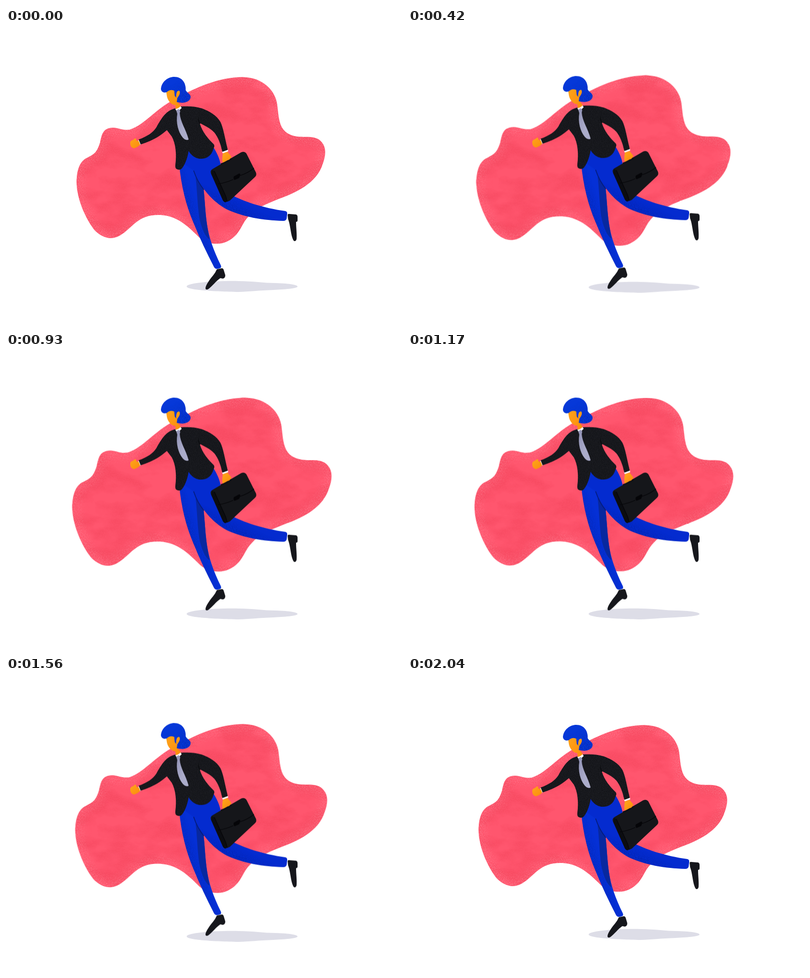
Animation, 800 px wide and 600 px high, one loop 2.07 s. Source, as an HTML page:

```html
<!DOCTYPE html>
<html lang="en">
<head>
<meta charset="utf-8">
<title>Running with a briefcase</title>
<style>
  html, body { margin: 0; width: 100%; height: 100%; overflow: hidden; background: #fff; }
  svg { display: block; width: 800px; height: 600px; }

  #blob, #runner, #shadow {
    animation: 2070ms cubic-bezier(.37, 0, .63, 1) infinite;
  }
  #blob { transform-origin: 346px 257px; animation-name: swell; }
  #runner { --shift: -6.5px; animation-name: drift; }
  #shadow { --shift: 7px; animation-name: drift; }

  @keyframes swell {
    0%, 90.3%, 100% { transform: scale(1); }
    39.6%, 50.7% { transform: scale(1.043); }
  }
  @keyframes drift {
    0%, 7.2%, 96.1%, 100% { transform: translateY(0); }
    46.8%, 57.5% { transform: translateY(var(--shift)); }
  }
</style>
</head>
<body>
<svg viewBox="0 0 800 600">
  <defs>
    <path id="cloud" d="M216 202C228 202 234 208 250 206C282 196 304 160 350 140C380 122 430 99.5 478 99.5C520 100 545 128 548 156C552 190 552 214 588 220C606 222 618 218 632 226C648 238 647 256 640 275C628 315 585 334 552 346C525 357 505 365 490 382C474 398 474 420 446 433C432 440 408 439 392 426C372 407 350 381 312 379C268 377 258 402 234 418C214 432 196 426 180 411C164 392 143 350 142.5 312C143 290 148 270 164 263C178 256 184 252 190 232C194 214 196 203 216 202Z"/>
    <path id="frontLeg" d="M350 278C354 320 364 360 378 393C391 425 405 455 420 484Q422 489 428 488L432 487Q436 486 434 481C419 450 410 425 406 398C402 370 402 350 399 326L386 270Z"/>
    <path id="backLeg" d="M352 270L369 245L418 240C427 254 433 268 434 280L455 338C478 351 520 365 564 371Q569 372 568 378L567 386Q566 391 560 391C520 390 478 383 445 367C415 350 394 324 379 289Z"/>
    <path id="hair" d="M313 124C314 109 327 99 340 99C356 99 364 112 363 126C365 131 372 133 373 139C373 149 361 154 345 150L343 139C339 139 342 132 341 128C336 124 328 126 325 130C319 132 314 130 313 124Z"/>
    <path id="jacket" d="M342 163L354 159C370 158 384 159 396 163C412 169 426 178 433 190C439 202 442 222 448 247L437 251C434 236 429 222 421 212C412 202 400 198 391 192C397 212 408 224 420 236Q422 239 419 245C415 260 404 266 391 265C382 264 373 257 369 249C366 266 361 278 355 285Q351 289 345 286Q342 285 342 279C345 256 343 235 335 220L325 207C307 223 290 230 272 236L268 226C285 220 297 212 304 201C315 181 324 167 342 163Z"/>
    <clipPath id="inCloud"><use href="#cloud"/></clipPath>

    <linearGradient id="legShade" gradientUnits="userSpaceOnUse" x1="355" y1="400" x2="402" y2="384">
      <stop offset=".2" stop-color="#001a86"/><stop offset=".9" stop-color="#001a86" stop-opacity="0"/>
    </linearGradient>
    <linearGradient id="thighShade" gradientUnits="userSpaceOnUse" x1="452" y1="378" x2="470" y2="340">
      <stop offset="0" stop-color="#001a86"/><stop offset=".8" stop-color="#001a86" stop-opacity="0"/>
    </linearGradient>
    <linearGradient id="hairShade" gradientUnits="userSpaceOnUse" x1="338" y1="104" x2="366" y2="150">
      <stop offset=".1" stop-color="#001f9c" stop-opacity="0"/><stop offset="1" stop-color="#001f9c"/>
    </linearGradient>
    <linearGradient id="skin" x1="0" y1="0" x2="1" y2="1">
      <stop offset="0" stop-color="#ffa51c"/><stop offset="1" stop-color="#fb8c0c"/>
    </linearGradient>
    <linearGradient id="tie" x1="0" y1="0" x2="1" y2="1">
      <stop offset="0" stop-color="#8f90b4"/><stop offset=".6" stop-color="#abacca"/>
    </linearGradient>

    <!-- speckled cut-out of whatever is drawn -->
    <filter id="grain" color-interpolation-filters="sRGB">
      <feTurbulence type="fractalNoise" baseFrequency=".65" numOctaves="2" seed="4"/>
      <feColorMatrix values="0 0 0 0 0  0 0 0 0 0  0 0 0 0 0  5 0 0 0 -2.1" result="dots"/>
      <feComposite in="SourceGraphic" in2="dots" operator="in"/>
    </filter>
    <filter id="softGrain" filterUnits="userSpaceOnUse" x="100" y="60" width="600" height="420" color-interpolation-filters="sRGB">
      <feGaussianBlur in="SourceGraphic" stdDeviation="9" result="soft"/>
      <feTurbulence type="fractalNoise" baseFrequency=".6" numOctaves="2" seed="9"/>
      <feColorMatrix values="0 0 0 0 0  0 0 0 0 0  0 0 0 0 0  4 0 0 0 -1.8" result="dots"/>
      <feComposite in="soft" in2="dots" operator="in"/>
    </filter>
    <filter id="patches" filterUnits="userSpaceOnUse" x="100" y="60" width="600" height="420" color-interpolation-filters="sRGB">
      <feTurbulence type="fractalNoise" baseFrequency=".014 .026" numOctaves="5" seed="21"/>
      <feColorMatrix values="0 0 0 0 0  0 0 0 0 0  0 0 0 0 0  4 0 0 0 -1.6" result="areas"/>
      <feTurbulence type="fractalNoise" baseFrequency=".5" numOctaves="2" seed="5"/>
      <feColorMatrix values="0 0 0 0 0  0 0 0 0 0  0 0 0 0 0  4 0 0 0 -1.4"/>
      <feComposite in="areas" operator="in"/>
      <feComposite in="SourceGraphic" operator="in" result="cut"/>
      <feComposite in="SourceGraphic" in2="areas" operator="in" result="wash"/>
      <feComposite in="wash" in2="cut" operator="arithmetic" k2=".5" k3=".5"/>
    </filter>
  </defs>

  <g id="blob">
    <use href="#cloud" fill="#ff566e"/>
    <g clip-path="url(#inCloud)">
      <use href="#cloud" fill="#f03f56" opacity=".45" filter="url(#patches)"/>
      <use href="#cloud" fill="none" stroke="#ff9cab" stroke-width="26" opacity=".55" filter="url(#softGrain)"/>
    </g>
  </g>

  <path id="shadow" fill="#dddde7" d="M365 524C365 517 420 512 470 513C500 513 520 517 545 517C575 518 589 521 589 524C589 528 560 530 540 531C510 532 490 534.5 470 535C420 534 365 531 365 524Z"/>

  <g id="runner">
    <!-- shoes -->
    <g fill="#16171c">
      <path d="M426 489L436 487Q439 487 440 491L443 501Q443 507 438 508L433 507C425 512 417 523 409 529Q404 532 403 528C403 521 413 508 418 502Q423 496 426 489Z"/>
      <path d="M569 379Q569 376 573 377L586 378Q589 379 589 383L589 390Q589 393 586 393C586 405 588 418 587 428Q585 434 581 431C576 423 575 406 572 394Q569 387 569 379Z"/>
    </g>

    <!-- trousers -->
    <use href="#frontLeg" fill="#0530d6"/>
    <use href="#frontLeg" fill="url(#legShade)" opacity=".65" filter="url(#grain)"/>
    <path fill="#08289f" d="M383 302L399 326C402 350 402 370 406 398L411 428C402 424 391 398 389 372C386 345 386 325 383 302Z"/>
    <use href="#backLeg" fill="#042bcf"/>
    <use href="#backLeg" fill="url(#thighShade)" opacity=".65" filter="url(#grain)"/>
    <path d="M379 289C384 304 391 317 400 328" fill="none" stroke="#051b78" stroke-width="1.6"/>

    <!-- briefcase and hand -->
    <path fill="url(#skin)" d="M438 254L448 251C450 256 455 258 455 262L450 269L440 274Q436 272 437 266Z"/>
    <path fill="#fff" d="M436 250L448 246L449 250L438 254Z"/>
    <path fill="#15161a" d="M417 286L475 252Q482 249 486 255L505 293Q507 298 503 302L452 350Q443 355 438 349L414 295Q412 289 417 286Z"/>
    <path fill="#0c0d11" d="M416 288L421 290L444 341Q447 348 445 353Q440 354 438 349L415 296Z"/>
    <path fill="none" stroke="#050508" stroke-width="1.2" d="M421 290L444 341L447 352M428 316Q444 314 459 307M473 299Q489 294 501 284"/>
    <path fill="#050508" d="M460 301L471 295Q474 295 473 299L471 304L462 308Q459 307 460 301Z"/>
    <path fill="none" stroke="#101116" stroke-width="3" d="M434 276Q444 273 456 265"/>
    <path fill="url(#skin)" d="M438 257L449 254Q457 261 451 267Q444 268 440 271Q436 267 438 257Z"/>

    <!-- fist -->
    <path fill="#fff" d="M267 228L271 226L274 235L270 237Z"/>
    <path fill="url(#skin)" d="M251 232C252 227 257 228 260 224Q264 223 263 228L268 229L271 236C267 241 262 243 258 244Q250 241 251 232Z"/>

    <!-- jacket, shirt and tie -->
    <use href="#jacket" fill="#1b1c21"/>
    <use href="#jacket" fill="#08090c" opacity=".4" filter="url(#grain)"/>
    <path fill="#0c0d10" d="M389 180Q389 188 393 194L391 194Q386 188 389 180Z"/>
    <path fill="#fff" d="M342 164L352 158L355 162L350 167L345 169Z"/>
    <path fill="url(#tie)" d="M344 167L349 164L352 168L351 173C352 190 363 204 369 226Q363 229 357 222C348 211 343 192 346 174Z"/>

    <!-- head -->
    <path fill="url(#skin)" d="M323 124L352 120L352 140L346 149L353 158Q349 163 343 164L342 156C334 156 327 148 325 138Z"/>
    <use href="#hair" fill="#0638d8"/>
    <use href="#hair" fill="url(#hairShade)" opacity=".6" filter="url(#grain)"/>
    <path fill="url(#skin)" d="M344 141C342 133 345 127 350 127C353 131 350 137 346 142L345 150L340 140Z"/>
    <path fill="#0638d8" d="M340 126L346 126Q344 133 343 140Q340 138 340 126Z"/>
  </g>
</svg>
</body>
</html>
```
